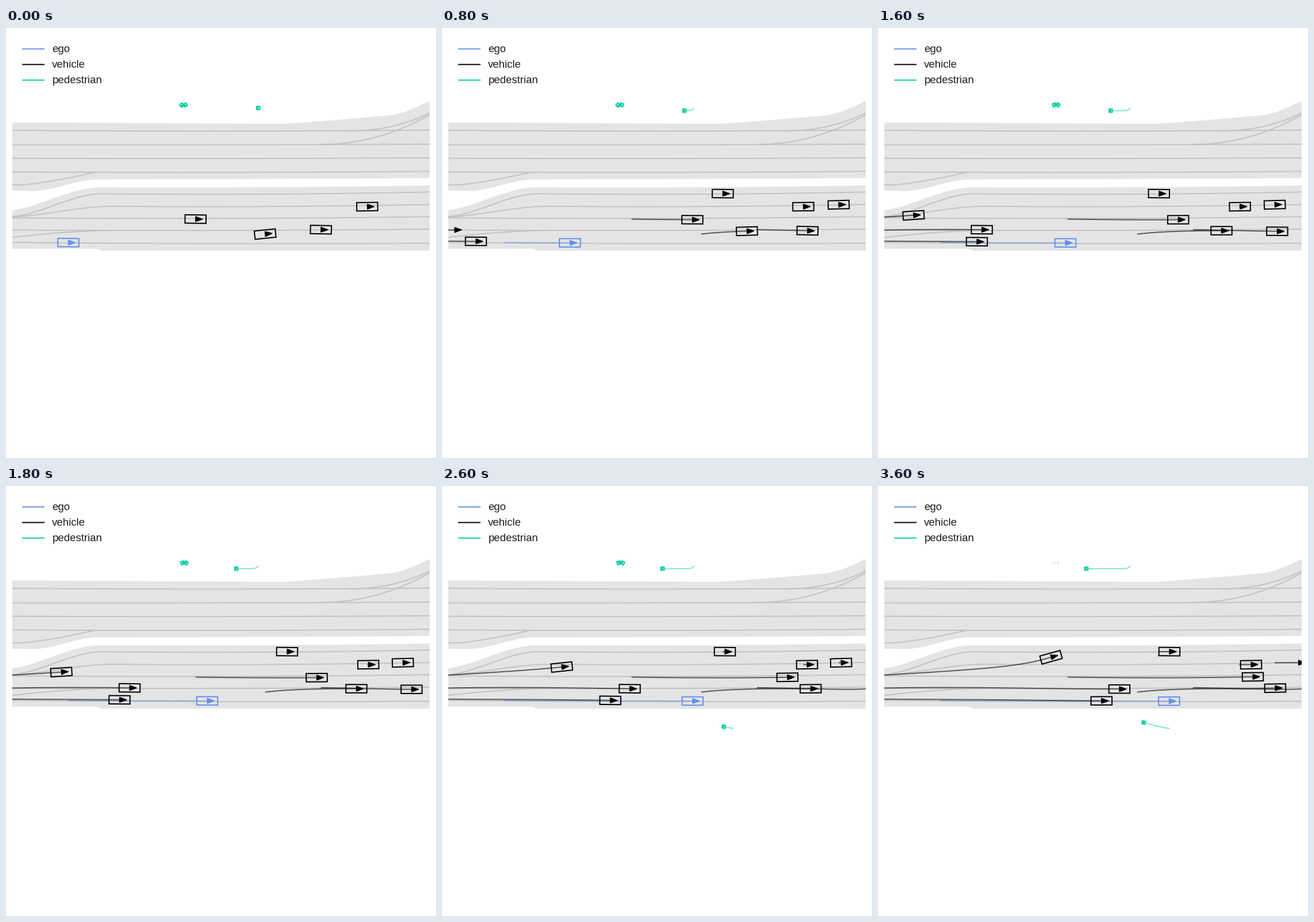
Recreate the animation shown at these times as a matplotlib script. Size 748 by 748 pixels, loop 3.8 s.

```python
import numpy as np
import matplotlib.pyplot as plt
from matplotlib.animation import FuncAnimation
from matplotlib.patches import Polygon, Rectangle

SIZE, DPI = 748, 100
FRAMES, STEP = 19, 200
LAST = FRAMES - 1
LEFT, RIGHT = 11, 737
PX = 72 / DPI
EGO, CAR, PED = "#6490ea", "black", "#05cea1"
ROAD, LANE = "#e4e4e4", "#c3c3c3"

plt.rcParams["font.family"] = "Liberation Sans"
plt.rcParams["path.simplify"] = False

fig = plt.figure(figsize=(SIZE / DPI, SIZE / DPI), dpi=DPI, facecolor="white")
ax = fig.add_axes([0, 0, 1, 1])
ax.set_xlim(0, SIZE)
ax.set_ylim(SIZE, 0)
ax.axis("off")
view = Rectangle((LEFT, 0), RIGHT - LEFT, SIZE, transform=ax.transData)


def clipped(artist):
    artist.set_clip_path(view)
    artist.set_snap(False)
    return artist


def line(x, y, color, **kw):
    return clipped(ax.plot(x, y, color=color, lw=2 * PX, solid_capstyle="butt", **kw)[0])


# --- road: ramps between two heights and slightly bowed stretches ---

def smooth(u):
    return u * u * (3 - 2 * u)


def ramp(x0, x1, y0, y1, shape=smooth):
    x = np.linspace(x0, x1, 60)
    return x, y0 + (y1 - y0) * shape((x - x0) / (x1 - x0))


def bow(y0, y1, rise=0.0, x0=LEFT):
    return ramp(x0, RIGHT, y0, y1, lambda u: u + 4 * rise / (y1 - y0) * u * (1 - u))


def join(*parts):
    return np.hstack(parts)


def road(top, bottom):
    outline = np.hstack([top, bottom[:, ::-1]]).T
    clipped(ax.add_patch(Polygon(outline, fc=ROAD, ec="none", zorder=0)))


def accel(power):
    return lambda u: u ** power


def decel(power):
    return lambda u: 1 - (1 - u) ** power


road(join(ramp(LEFT, 484, 164.5, 166.6), ramp(484, 668, 166.6, 152, accel(1.1)),
          ramp(668, RIGHT, 152, 127, accel(1.4))),
     join(([LEFT], [283]), ramp(45, 160, 283.6, 263.4), bow(263.4, 261, 0.3, x0=160)))
road(join(ramp(-10, 165, 319, 277.2), bow(277.2, 274, 1.5, x0=165)),
     join(([LEFT, 156], [384, 384]), ramp(156, 168, 384, 387.2), ([RIGHT], [387.5])))

lanes = [
    bow(178, 177.6, 1.5), bow(203.4, 202, 0.6), bow(226.6, 225.8, 0.9), bow(250.4, 249.3, 1.4),
    bow(330.3, 328.3, 2), bow(351.5, 349.9, 1.4), bow(373, 374.4, 1.3),
    ramp(595, RIGHT, 179, 148, accel(2.2)),
    ramp(545, RIGHT, 202.6, 151, accel(2.1)),
    join(([LEFT], [273]), ramp(25, 152, 273, 251.5, accel(1.35))),
    join(ramp(0, 168, 328.6, 288.3), bow(288.3, 285.3, 2.2, x0=168)),
    join(ramp(-10, 187, 329.6, 310.1), bow(310.1, 307, 1.9, x0=187)),
    ramp(LEFT, 190, 364.2, 352, decel(1.7)),
]
for x, y in lanes:
    line(x, y, LANE, zorder=1)

for row, (name, color) in enumerate([("ego", EGO), ("vehicle", CAR), ("pedestrian", PED)]):
    y = 36.4 + 27.1 * row
    line([28, 67], [y, y], color)
    ax.text(80.4, 42.2 + 27 * row, name, size=18.67 * PX, color="#1c1c1c", va="baseline")


# --- agents ---

class Agent:
    """A box with a heading arrow and a trail, along one pose per step."""

    def __init__(self, t, x, y, tilt, color=CAR, size=(36.5, 14.5), alpha=0.6):
        self.start, self.end = t[0], t[-1]
        self.x, self.y, self.tilt = (v + 0.0 * t for v in (x, y, tilt))
        a, b = size[0] / 2, size[1] / 2
        self.box_shape = np.array([(-a, -b), (a, -b), (a, b), (-a, b)])
        self.arrow_shape = np.array([(0, -0.62 * b), (0.68 * a, 0), (0, 0.62 * b)])
        self.trail = line([], [], color, alpha=alpha, zorder=3, solid_joinstyle="round")
        style = dict(ec=color, zorder=4)
        self.box = clipped(ax.add_patch(Polygon(self.box_shape, fill=False, lw=2 * PX, **style)))
        self.arrow = clipped(ax.add_patch(Polygon(self.arrow_shape, fc=color, lw=1.2 * PX, **style)))

    def draw(self, step):
        n = max(min(step, self.end) - self.start + 1, 0)
        self.trail.set_data(self.x[:n], self.y[:n])
        alive = self.start <= step <= self.end
        self.arrow.set_visible(alive)
        self.box.set_visible(False)
        if not alive:
            return
        k = step - self.start
        c, s = np.cos(self.tilt[k]), np.sin(self.tilt[k])
        turn = np.array([(c, s), (-s, c)])
        place = np.array([self.x[k], self.y[k]])
        box = self.box_shape @ turn + place
        self.box.set_xy(box)
        self.arrow.set_xy(self.arrow_shape @ turn + place)
        # only boxes wholly inside the view are outlined
        self.box.set_visible(box[:, 0].min() >= LEFT and box[:, 0].max() <= RIGHT)


def cruise(*points, first=None, **kw):
    """Drive the polynomial through (step, x, y) points, facing along the path."""
    key, px, py = np.array(points, float).T
    t = np.arange(key[0] if first is None else first, key[-1] + 1).astype(int)
    x, y = (np.polyval(np.polyfit(key, p, len(key) - 1), t) for p in (px, py))
    return Agent(t, x, y, np.arctan2(np.gradient(y), np.gradient(x)), **kw)


def pull_off(first, x0, x1, y, power, tilt):
    """Stand almost still, then roll away."""
    t = np.arange(first, FRAMES)
    return Agent(t, x0 + (x1 - x0) * (t / LAST) ** power, y, np.radians(tilt))


def walker(t, x, y, tilt):
    return Agent(t, x, y, np.radians(tilt), PED, (5.5, 5.5), 0.5)


walk, late, pair = np.arange(FRAMES), np.arange(10, FRAMES), np.arange(14)

agents = [
    cruise((0, 108.5, 373.3), (4, 222.5, 373.7), (9, 350, 373.8), (15, 470.3, 374.2),
           (18, 506.3, 374.3), color=EGO),
    cruise((0, 329.7, 332.4), (4, 435.5, 333.5), (9, 540.5, 333.4), (15, 624, 332.4), (18, 652, 332)),
    cruise((0, 450.8, 358.5), (4, 530.4, 353.4), (9, 609.5, 352.6), (15, 654.6, 352.4),
           (18, 691, 351.6)),
    cruise((0, 547.8, 350.8), (4, 635.8, 352.6), (9, 705.5, 353.7), (13, 740, 352.7)),
    cruise((4, 59, 371.1), (6, 118.2, 371.4), (9, 197.5, 371.9), (15, 335.6, 373.4),
           (18, 388.8, 373.7), first=2),
    cruise((4, 22, 351.3), (6, 104.7, 350.6), (9, 215, 351.2), (15, 367.9, 353),
           (18, 419.9, 353.2), first=3),
    cruise((7, 25, 328.1), (9, 96.3, 323.7), (11, 157.6, 319.4), (15, 249.6, 309.6),
           (18, 301, 297.9), first=6),
    pull_off(0, 628.4, 649, 310.8, 3.5, -0.8),
    pull_off(1, 488.4, 506.9, 288.1, 5, 0.5),
    pull_off(1, 690, 731.5, 307.4, 7, -1.5),
    walker(walk, 438.8 - 4.25 * walk, 143.8 - 4.6 * 0.2 ** walk, 180),
    walker(late, 507 - 5.6 * (late - 10), 421.7 - 10.2 * ((late - 10) / 8) ** 1.25, 193),
    walker(pair, 305.6 + 0.15 * pair, 134.1 - 0.03 * pair, np.where(pair < 8, 37, -18)),
    walker(pair, 311.9 + 0.17 * pair, 133.8, 210 - 60 * 0.65 ** pair),
]


def draw(step):
    for agent in agents:
        agent.draw(step)
    return []


anim = FuncAnimation(fig, draw, frames=FRAMES, interval=STEP, repeat=True,
                     repeat_delay=0, init_func=lambda: draw(0))
plt.show()
```
